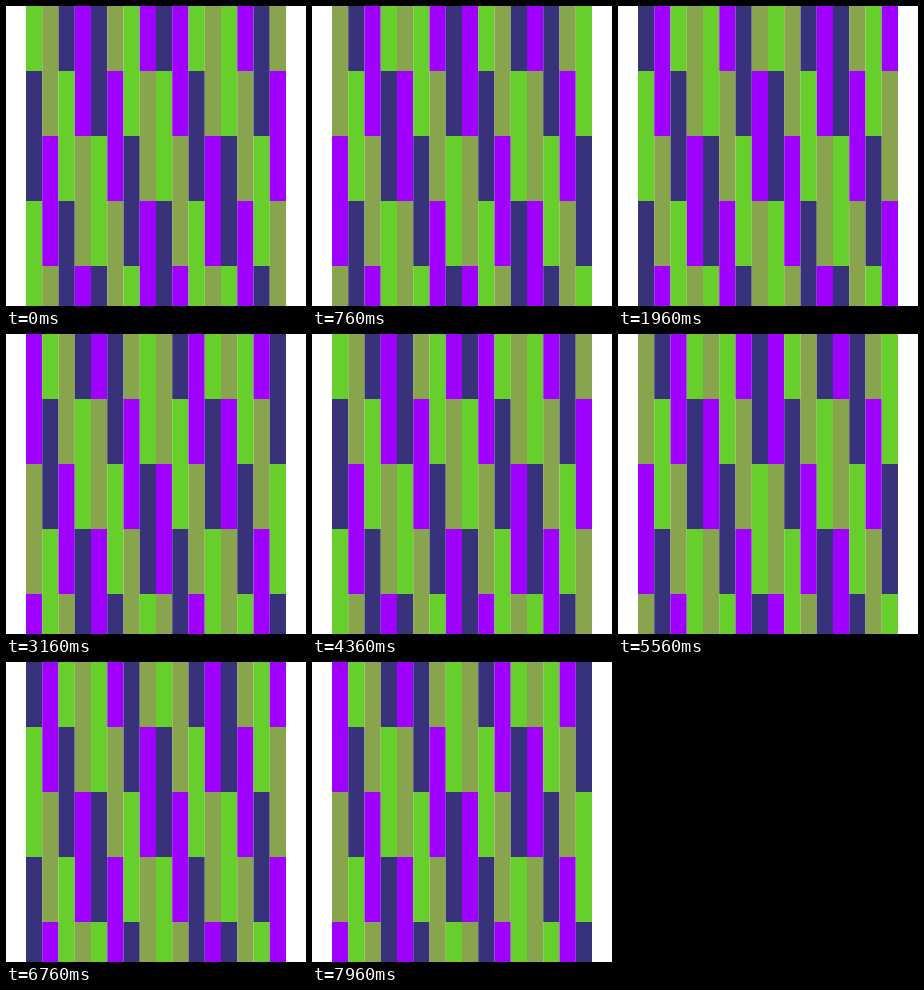
Write an HTML page with a canvas that moves like this. It is 300 by 300 pixels and loops after 8.4 s.

```html
<!DOCTYPE html>
<html lang="en">
<head>
<meta charset="utf-8">
<title>Turning stripes</title>
<style>
  html, body { margin: 0; width: 100%; height: 100%; overflow: hidden; background: #fff; }
  canvas { display: block; }
</style>
</head>
<body>
<canvas id="stage" width="300" height="300"></canvas>
<script>
const ctx = document.getElementById('stage').getContext('2d');
const LOOP = 8400, STEP = 1200, LEAD = 440;
const COLS = 16, LEFT = 20, COL_W = 260 / COLS, ROW_H = 65;

// Opposite colours sit two places apart, so XOR 2 swaps them.
const COLORS = ['#66cf2c', '#88a54e', '#37327a', '#a000ff'];
const SEQUENCE = [...'0123210323010321'].map(Number);

// Each turn maps every column pair (a, b) to (b, opposite of a).
function colorAt(col, row, turn) {
  const base = SEQUENCE[((col ^ (turn & 1)) + 4 * row) % COLS];
  const flipped = ((turn + (col & 1)) >> 1) & 1;
  return COLORS[base ^ (flipped * 2)];
}

function draw(turn) {
  ctx.fillStyle = '#fff';
  ctx.fillRect(0, 0, 300, 300);
  for (let row = 0; row < 5; row++) {
    for (let col = 0; col < COLS; col++) {
      ctx.fillStyle = colorAt(col, row, turn);
      ctx.fillRect(LEFT + col * COL_W, row * ROW_H, COL_W, ROW_H);
    }
  }
}

const start = performance.now();
function tick() {
  const time = (performance.now() - start) % LOOP;
  draw(Math.floor((time + LEAD) / STEP) % 4);
  requestAnimationFrame(tick);
}
tick();
</script>
</body>
</html>
```
